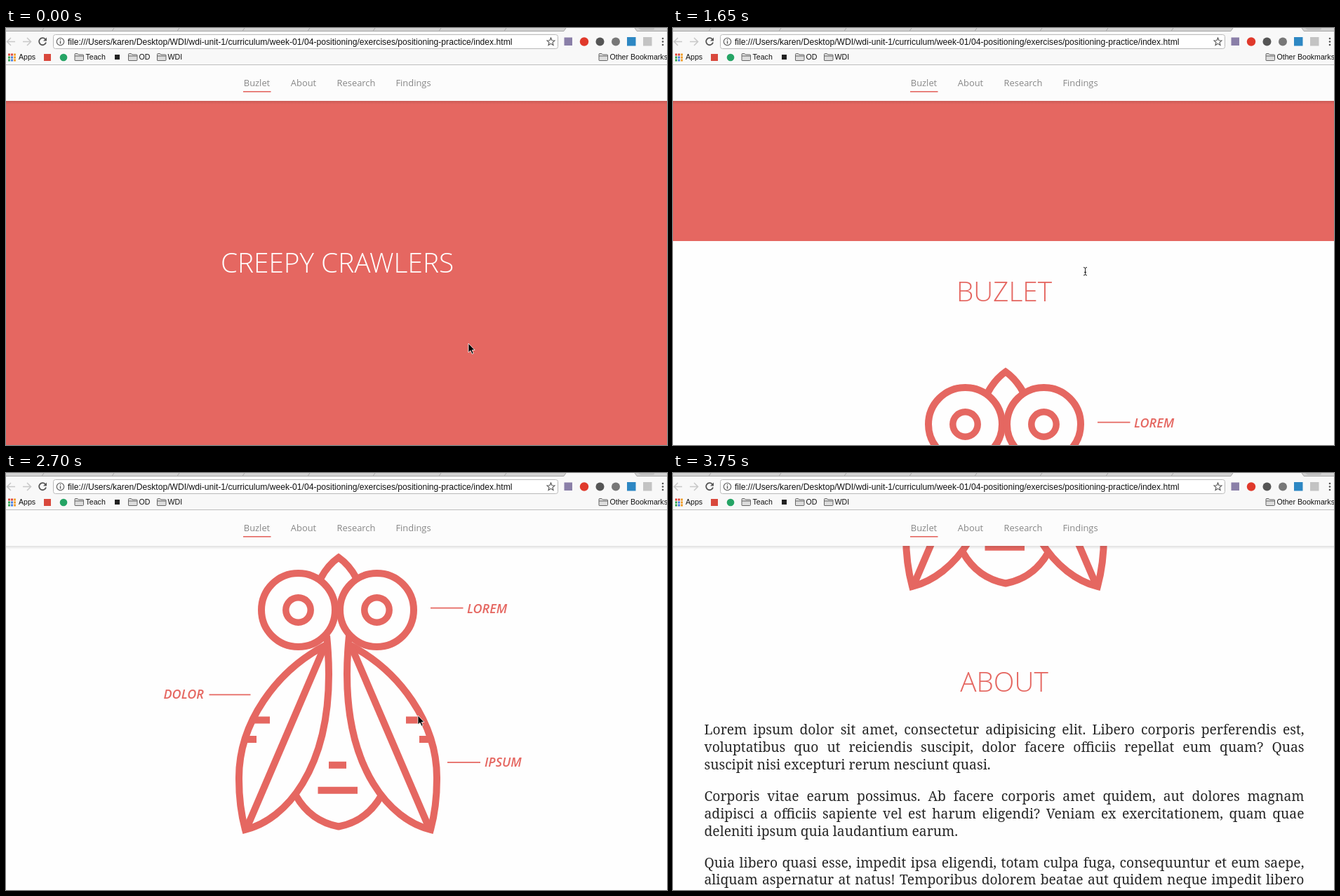
Recreate the animation shown at these times as an HTML page. Size 942 by 595 pixels, loop 4600 ms.

```html
<!DOCTYPE html>
<html lang="en">
<head>
<meta charset="utf-8">
<title>Creepy Crawlers</title>
<style>
html, body { margin: 0; width: 100%; height: 100%; overflow: hidden; background: #fefefe; }
#stage { position: relative; width: 942px; height: 595px; overflow: hidden; }
#page, #stage > svg { position: absolute; left: 0; top: 0; }
svg { display: block; }
text { font-family: "Open Sans", sans-serif; }
.head { font-size: 38.8px; font-weight: 300; text-anchor: middle; fill: #e56761; }
.label { font-size: 18px; font-weight: 600; font-style: italic; fill: #e56761; }
.nav text { font-size: 12.9px; fill: #888; text-anchor: middle; }
.ui text { font-family: "Liberation Sans", Arial, sans-serif; font-size: 10.6px; fill: #111; }
.ui .url { font-size: 12.14px; }
#copy { position: absolute; left: 44.5px; top: 1381.4px; width: 855px;
  font: 19.3px/24.8px "Noto Serif", serif; color: #262626; }
#copy p { margin: 0 0 20.2px; }
#copy span { display: block; height: 24.8px; text-align: justify; text-align-last: justify; }
#copy span:nth-child(3) { text-align-last: left; }
</style>
</head>
<body>
<div id="stage">
  <div id="page">
    <svg width="942" height="1700">
      <rect width="942" height="614" fill="#e56761"/>
      <text class="head" x="472" y="348.8" style="fill:#fff">CREEPY CRAWLERS</text>
      <text class="head" x="472" y="700.3">BUZLET</text>
      <text class="head" x="472" y="1338.6">ABOUT</text>
      <g transform="translate(0 717)" fill="none" stroke="#e56761" stroke-width="10">
        <path d="M449 112.5Q459 94 474 83.5Q489 94 499 112.5"/>
        <g id="eye">
          <circle cx="416.5" cy="158.5" r="52.5"/>
          <circle cx="416.5" cy="158.5" r="17.7" stroke-width="9.5"/>
        </g>
        <use href="#eye" x="112"/>
        <g id="wing">
          <path d="M457 208C385 245 331 320 332 400C332 425 335 450 341 472C400 457 460 385 460 250C460 232 459 215 457 195"/>
          <path d="M342 472L455 208M352 315.5h24M342 343h15"/>
        </g>
        <use href="#wing" transform="translate(946) scale(-1 1)"/>
        <path d="M413 423Q434 460 474 467.5Q514 460 535 423M460 379.7h25M444.5 415.7h56.5"/>
        <path stroke-width="1.7" d="M605 155.7h46.5M289.5 279.3h59M629 375.8h47"/>
        <g stroke="none">
          <text class="label" x="657" y="162.5">LOREM</text>
          <text class="label" x="224.5" y="285">DOLOR</text>
          <text class="label" x="682" y="381.5">IPSUM</text>
        </g>
      </g>
    </svg>
    <div id="copy"></div>
  </div>

  <svg width="942" height="595">
    <defs>
      <linearGradient id="shade" x2="0" y2="1">
        <stop stop-opacity=".12"/><stop offset="1" stop-opacity="0"/>
      </linearGradient>
      <path id="folder" d="M.5 10V1.5Q.5.5 1.5.5H4.5L6 2H12Q13 2 13 3V9.5Q13 10.5 12 10.5H1Q.5 10.5.5 10ZM.5 4H13" fill="#ddd" stroke="#666"/>
    </defs>
    <rect y="104" width="942" height="5" fill="url(#shade)"/>
    <rect width="942" height="104" fill="#fcfcfc"/>
    <g class="nav">
      <text x="357.5" y="82.5">Buzlet</text>
      <text x="424" y="82.5">About</text>
      <text x="499" y="82.5">Research</text>
      <text x="580.5" y="82.5">Findings</text>
      <rect x="338" y="90" width="39.5" height="1.6" fill="#e56761"/>
    </g>

    <g class="ui">
      <rect width="942" height="52" fill="#f8f8f8"/>
      <path d="M0 52.5H942" stroke="#bdbdbd"/>
      <path d="M0 0H798L795 4.5H0ZM896 0H942V4.5H899Z" fill="#d2d2d2"/>
      <path id="tabs" fill="none" stroke="#a8a8a8"/>
      <path d="M901 0L903 2Q904 3 906 3H922Q924 3 924 0Z" fill="#c0c0c0"/>
      <rect x="67.5" y="9.5" width="719" height="20" rx="3" fill="#fff" stroke="#b9b9b9"/>
      <g fill="none" stroke="#c8c8c8" stroke-width="1.5">
        <path d="M13 19.5H2M7 14L1.5 19.5L7 25M24 19.5H35M30 14L35.5 19.5L30 25"/>
        <path d="M56 16A5 5 0 1 0 57 20.5" stroke="#555" stroke-width="1.8"/>
        <path d="M58 13.5V18.5H53Z" fill="#555" stroke="none"/>
        <g stroke="#555" stroke-width="1.1">
          <circle cx="77.5" cy="19.5" r="5.2"/>
          <path d="M77.5 18.5V22.5M77.5 16V17.3" stroke-width="1.4"/>
          <path d="M776.5 14L778 17.7L782 18L779 20.6L780 24.5L776.5 22.4L773 24.5L774 20.6L771 18L775 17.7Z"/>
        </g>
      </g>
      <text class="url" x="88" y="23.5">file:///Users/karen/Desktop/WDI/wdi-unit-1/curriculum/week-01/04-positioning/exercises/positioning-practice/index.html</text>

      <rect x="795.5" y="13.5" width="11.5" height="11.5" fill="#8a7fa8"/>
      <circle cx="824" cy="19.5" r="6.2" fill="#e0392b"/>
      <circle cx="846.5" cy="19.5" r="6" fill="#555"/>
      <circle cx="869" cy="19.5" r="6" fill="#777"/>
      <rect x="885" y="13" width="12.5" height="12.5" fill="#2d87c3"/>
      <rect x="908" y="13" width="12.5" height="12.5" fill="#c3c3c3"/>
      <g fill="#555">
        <circle cx="936" cy="15" r="1.3"/><circle cx="936" cy="19.5" r="1.3"/><circle cx="936" cy="24" r="1.3"/>
      </g>

      <g id="apps"></g>
      <rect x="54" y="37" width="10" height="10" fill="#d9483c"/>
      <circle cx="82" cy="42" r="5.3" fill="#25a465"/>
      <rect x="155" y="38" width="7" height="7" fill="#222"/>
      <use href="#folder" x="97.5" y="36"/>
      <use href="#folder" x="174" y="36"/>
      <use href="#folder" x="215" y="36"/>
      <use href="#folder" x="844.5" y="36"/>
      <text x="18" y="45">Apps</text>
      <text x="113.5" y="45">Teach</text>
      <text x="189.5" y="45">OD</text>
      <text x="230.5" y="45">WDI</text>
      <text x="860.5" y="45">Other Bookmarks</text>
    </g>

    <path id="arrow" d="M0 0V13L3 10.3L5.2 15.2L7.3 14.2L5.2 9.5H9Z" fill="#000" stroke="#fff" stroke-width=".8"/>
    <path id="beam" d="M585 341.5Q587.5 341.5 587.5 343.5Q587.5 341.5 590 341.5M587.5 343V351.5M585 353Q587.5 353 587.5 351Q587.5 353 590 353M586 348.5H589" fill="none" stroke="#222"/>
  </svg>
</div>
<script>
const $ = id => document.getElementById(id);
const LOOP = 4600, TICK = 150;
// Scroll offset at each tick; the last one holds until the loop ends.
const scroll = [0, 0, 0, 0, 0, 9, 56, 132, 198, 228, 240, 310, 382, 408, 418, 425,
  541, 644, 680, 702, 717, 845, 955, 1005, 1027];

const copy = [
  ["Lorem ipsum dolor sit amet, consectetur adipisicing elit. Libero corporis perferendis est,",
   "voluptatibus quo ut reiciendis suscipit, dolor facere officiis repellat eum quam? Quas",
   "suscipit nisi excepturi rerum nesciunt quasi."],
  ["Corporis vitae earum possimus. Ab facere corporis amet quidem, aut dolores magnam",
   "adipisci a officiis sapiente vel est harum eligendi? Veniam ex exercitationem, quam quae",
   "deleniti ipsum quia laudantium earum."],
  ["Quia libero quasi esse, impedit ipsa eligendi, totam culpa fuga, consequuntur et eum saepe,",
   "aliquam aspernatur at natus! Temporibus dolorem beatae aut quidem neque impedit libero"]
];
$("copy").innerHTML = copy.map(lines =>
  `<p>${lines.map(line => `<span>${line}</span>`).join("")}</p>`).join("");

const edges = [52, 152, 245, 338, 431, 524, 618, 711];
$("tabs").setAttribute("d", "M0 4.5H795L798 0M896 0L899 4.5H942" +
  edges.map(x => `M${x + 2} 0L${x - 1} 4.5`).join(""));

const dots = ["#e0483c", "#e0483c", "#f0a030", "#3aa757", "#4a80e0", "#f0a030", "#3aa757", "#4a80e0", "#f0a030"];
$("apps").innerHTML = dots.map((color, i) =>
  `<rect x="${3 + i % 3 * 4}" y="${36.5 + (i / 3 | 0) * 4}" width="3" height="3" fill="${color}"/>`).join("");

function pointer(tick) {
  if (tick < 2) return [659, 450];
  if (tick < 3) return [626, 415.5];
  return tick >= 17 && tick < 21 ? [587, 346] : null;
}

function draw(now) {
  const tick = Math.floor(now % LOOP / TICK);
  const offset = scroll[Math.min(tick, scroll.length - 1)];
  $("page").style.transform = `translateY(${-offset}px)`;
  const tip = pointer(tick);
  $("arrow").style.display = tip ? "" : "none";
  if (tip) $("arrow").setAttribute("transform", `translate(${tip})`);
  $("beam").style.display = tick >= 3 && tick < 17 ? "" : "none";
}

const start = performance.now();
function loop() {
  draw(performance.now() - start);
  requestAnimationFrame(loop);
}
loop();
</script>
</body>
</html>
```
